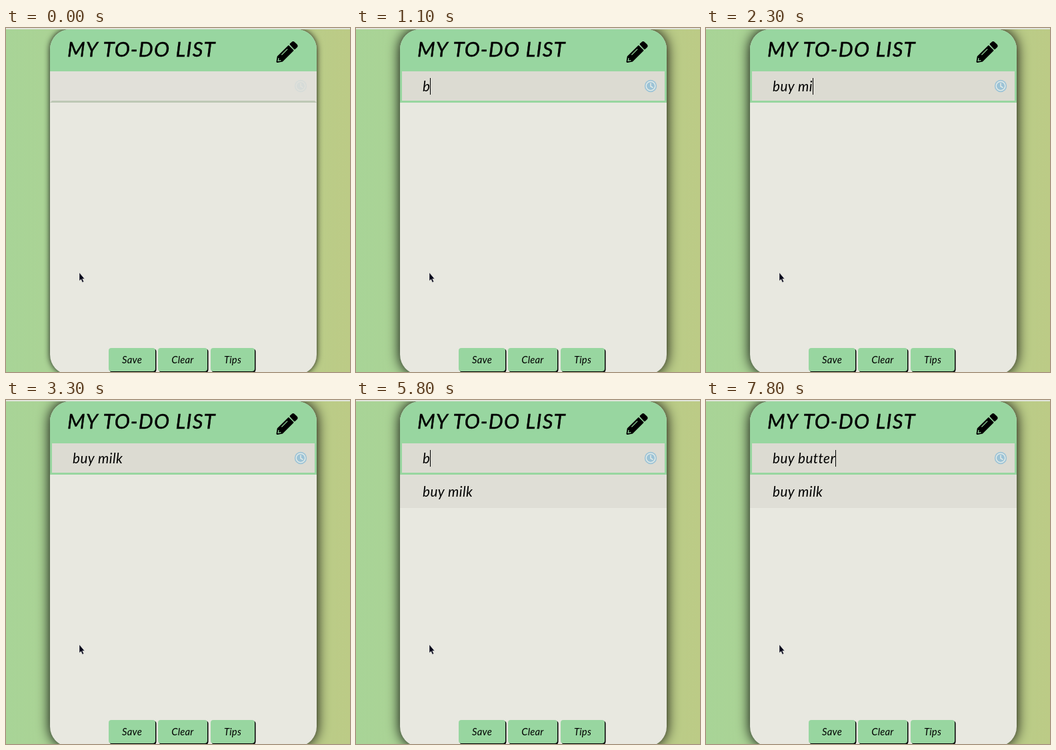
Write an HTML page that moves like this. It is 516 px wide and 516 px high and loops after 8000 ms.

```html
<!DOCTYPE html>
<html lang="en">
<head>
<meta charset="utf-8">
<title>To-do list</title>
<style>
  :root { --mint: #98d6a0; --paper: #e8e8e0; }
  html, body { margin: 0; width: 100%; height: 100%; overflow: hidden; }
  body { position: relative; background: linear-gradient(90deg, #a8d497, #bccb86); }
  #stage { position: absolute; inset: 0 auto auto 0; width: 516px; height: 516px; overflow: hidden;
    font: italic 20.7px Lato, "Open Sans", sans-serif; letter-spacing: .45px; color: #000; }
  #stage > *, .card > * { position: absolute; box-sizing: border-box; white-space: pre; }
  .strip { left: 0; top: 0; width: 516px; height: 2px; background: #e1e4da; }
  .card { left: 66px; top: 2px; width: 400px; height: 518px; overflow: hidden;
    border-radius: 30px; background: var(--paper); box-shadow: 0 0 19px #000; }
  .head { left: 0; top: 0; width: 400px; height: 63px; background: var(--mint); }
  .title { left: 26px; top: 10px; font-size: 31px; line-height: 38px; letter-spacing: 1.1px;
    -webkit-text-stroke: .4px #000; }
  .entry { left: 0; top: 63px; width: 400px; height: 47px; background: #dcdbd2;
    border: solid var(--mint); border-width: 0 3px 3px; padding-left: 31px; line-height: 45px; }
  .typed { position: relative; display: inline-block; height: 44px; }
  .caret { position: absolute; left: 100%; top: 10px; width: 1px; height: 25px; background: #000; }
  .item { left: 0; top: 110px; width: 400px; height: 50px; padding-left: 34px;
    background: #dfded6; line-height: 50px; }
  .button { top: 480px; height: 35px; border-radius: 4px; background: var(--mint);
    box-shadow: 1.5px 1.5px 0 #000; font-size: 14.8px; line-height: 35px; letter-spacing: .2px;
    text-align: center; }
  svg { left: 0; top: 0; }
  .fresh .card { box-shadow: 0 0 10px rgba(0, 0, 0, .9); }
  .fresh .entry { background: #e1e0d9; border-color: #e1e0d9 #e1e0d9 #bdc8b5; }
  .fresh .clock { opacity: .15; }
</style>
</head>
<body>
<div id="stage">
  <div class="card">
    <div class="head"></div>
    <div class="title">MY TO-DO LIST</div>
    <div class="entry"><span class="typed"><span id="text"></span><i class="caret" id="caret"></i></span></div>
    <div class="item" id="item">buy milk</div>
  </div>
  <div class="button" style="left:154px;width:70px">Save</div>
  <div class="button" style="left:228px;width:74px">Clear</div>
  <div class="button" style="left:307px;width:66px">Tips</div>
  <div class="strip"></div>
  <svg width="516" height="516">
    <g id="pencil">
      <path d="M426 25.2Q425.1 24.2 426 23.2L428.6 20.9Q430.7 19.2 432.8 20.9L436.8 24.7Q438.6 26.8 436.8 28.9L433.8 31.8Q432.8 32.6 431.9 31.8Z"/>
      <path d="M423.3 26.3L406.8 42.6L405.5 50.6Q405.4 52.2 407.2 52L414.9 50.6L431.3 34.2Q431.7 33.6 431.2 33L424.4 26.3Q423.8 25.8 423.3 26.3Z"/>
      <path d="M413.4 40.4L422.2 31.6M409 45.2L408.2 49.3L412.4 48.6" fill="none" stroke="#98d6a0" stroke-width="1.3"/>
    </g>
    <g class="clock" fill="none" stroke="#e3ebe8">
      <circle cx="442" cy="87" r="9.2" fill="#9cc3d6" stroke="none"/>
      <circle cx="442" cy="87" r="6.8" stroke-width="1.5"/>
      <path d="M442 82.5V87.5L445.5 89.5" stroke-width="1.5"/>
    </g>
    <path d="M110 367V379.2L112.6 376.9L114.6 381.4L116.6 380.5L114.6 376.2H117.8Z" fill="#06061a" stroke="#f2f2ee" stroke-width=".4"/>
  </svg>
</div>
<script>
  const LOOP = 8000;
  // Time in ms, text in the field, caret shown.
  const steps = [
    [0, "", 0], [500, "", 1],
    [1100, "b", 1], [1300, "bu", 1], [1500, "buy", 1], [1800, "buy ", 1],
    [2000, "buy m", 1], [2300, "buy mi", 1], [2500, "buy mil", 1], [2800, "buy milk", 1],
    [3300, "buy milk", 0], [3800, "buy milk", 1],
    [4400, "", 1], [5400, "", 0],
    [5700, "b", 1], [5900, "bu", 1], [6000, "buy", 1], [6500, "buy", 0], [6700, "buy ", 1],
    [6900, "buy b", 1], [7100, "buy bu", 1], [7200, "buy but", 1],
    [7400, "buy butt", 1], [7600, "buy butte", 1], [7800, "buy butter", 1]
  ];
  const get = id => document.getElementById(id);
  const stage = get("stage"), text = get("text"), caret = get("caret"), item = get("item");
  const show = (el, on) => { el.style.visibility = on ? "visible" : "hidden"; };
  const start = performance.now();
  let last;

  function draw(now) {
    const t = Math.max(0, now - start) % LOOP;
    const step = steps.findLast(s => s[0] <= t);
    if (step !== last) {
      last = step;
      text.textContent = step[1];
      show(caret, step[2]);
      show(item, step[0] >= 4400);
      stage.classList.toggle("fresh", step[0] < 500);
    }
    requestAnimationFrame(draw);
  }
  draw(start);
</script>
</body>
</html>
```
